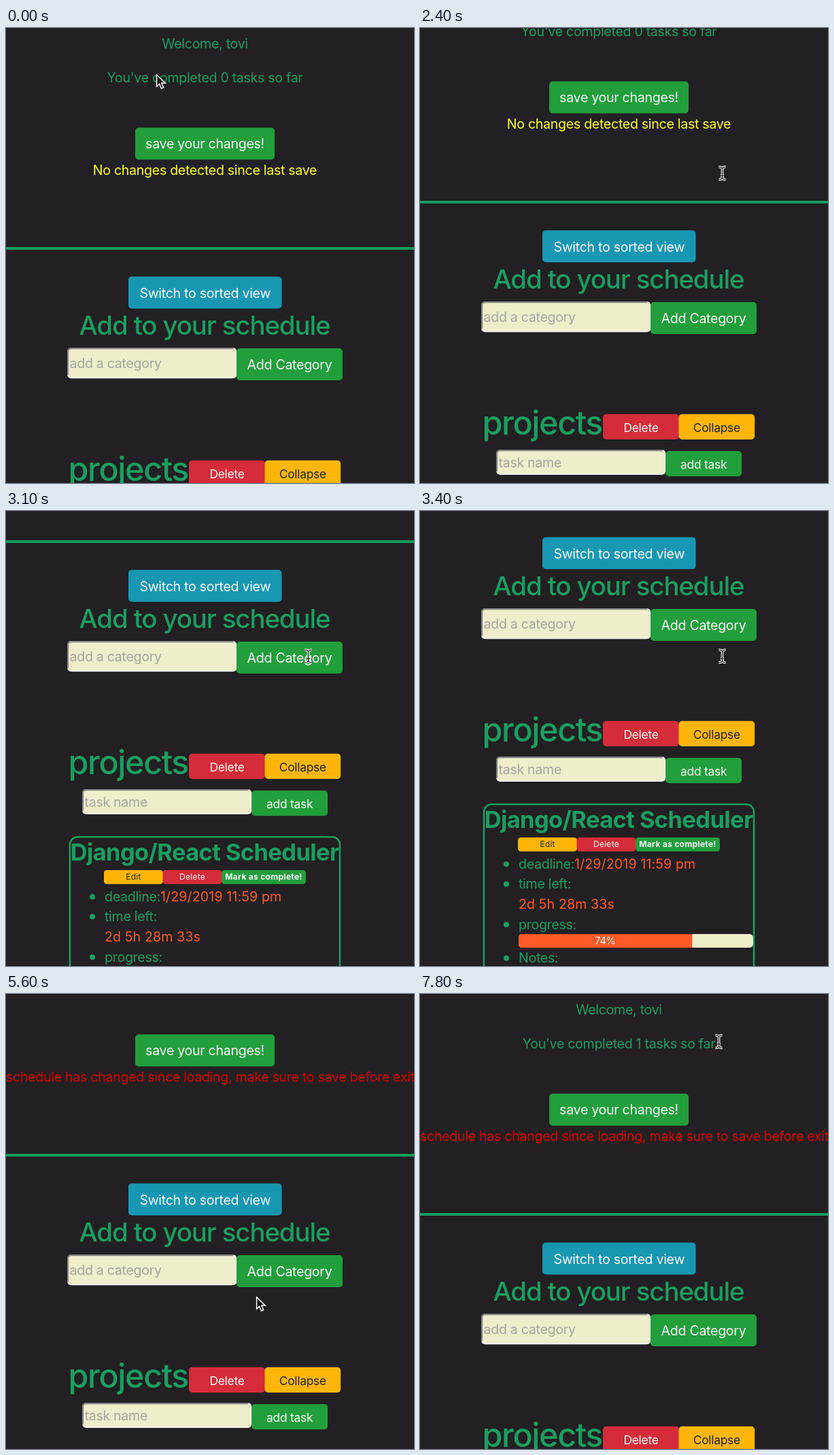
Recreate the animation shown at these times as an HTML page. Size 600 by 669 pixels, loop 7.9 s.

```html
<!DOCTYPE html>
<html lang="en">
<head>
<meta charset="utf-8">
<title>Schedule</title>
<style>
  html, body { margin: 0; width: 100%; height: 100%; overflow: hidden; background: #222022; }
  svg { display: block; width: 100%; height: 100%; }
  text {
    font-family: Inter, "Open Sans", sans-serif;
    font-variation-settings: "opsz" 14;
    font-size: 19.6px;
    letter-spacing: -.0155em;
    white-space: pre;
  }
  .mid { text-anchor: middle; }
  .h1 { font-size: 48.4px; font-weight: 500; letter-spacing: -.0285em; }
  .h2 { font-size: 38.4px; font-weight: 500; letter-spacing: -.0285em; }
  .h3 { font-size: 34.4px; font-weight: 700; letter-spacing: -.0165em; }
  .num { letter-spacing: .006em; }
  .btn { font-size: 17.4px; }
  .pct { font-size: 14.5px; }
  .tiny { font-size: 12.1px; letter-spacing: .02em; }
  .bold { font-weight: 700; }
</style>
</head>
<body>
<svg id="stage" viewBox="0 0 600 669" xmlns="http://www.w3.org/2000/svg"></svg>
<script>
const LOOP = 7900, STEP = 100, DONE = 5000;
const C = {
  bg: '#222022', text: '#1a9e62', green: '#229e3c', dark: '#1b7a30', blue: '#1897b3',
  red: '#d62c39', amber: '#ffb608', cream: '#eeeecb', hint: '#a6a6a0',
  orange: '#ff5a28', ink: '#25262a', white: '#f8f8f8', yellow: '#ffff22', alert: '#d60000'
};

const text = (x, y, str, fill = C.text, cls = '', id = '') =>
  `<text x="${x}" y="${y}" fill="${fill}" class="${cls}" id="${id}">${str}</text>`;

const box = (x, y, w, h, fill, r = 5, id = '') =>
  `<rect x="${x}" y="${y}" width="${w}" height="${h}" rx="${r}" fill="${fill}" id="${id}"/>`;

const button = (x, y, w, h, base, label, fill, cls = '', ink = C.white, id = '') =>
  box(x, y, w, h, fill, h > 30 ? 5 : 4.5, id) + text(x + w / 2, base, label, ink, 'mid ' + cls);

// Inset-bordered field: dark top and left edges, light bottom and right
const field = (x, y, w, h, base, hint) =>
  box(x, y, w, h, '#eeeee6', 6) +
  `<path d="M${x + 1.2} ${y + h - 5}V${y + 6}q0-4.8 4.8-4.8H${x + w - 5}" fill="none" stroke="#858583" stroke-width="2.4"/>` +
  box(x + 2.4, y + 2.4, w - 4.4, h - 4.4, C.cream, 3.5) +
  text(x + 3.5, base, hint, C.hint);

const bullet = y => `<circle cx="127" cy="${y}" r="4" fill="${C.text}"/>`;
const item = (y, label) => bullet(y - 6.6) + text(145, y, label);

const page =
  text(292.5, 30, 'Welcome, tovi', C.text, 'mid') +
  text(292.5, 79.5, '', C.text, 'mid', 'count') +
  button(190, 146.5, 205, 47, 177.3, 'save your changes!', C.green) +
  text(292.5, 215.6, 'No changes detected since last save', C.yellow, 'mid', 'saved') +
  text(0, 215.6, 'schedule has changed since loading, make sure to save before exit', C.alert, '', 'unsaved') +
  box(0, 322, 600, 4, '#169b62', 0) +
  button(180, 365.5, 225.5, 47, 396.6, 'Switch to sorted view', C.blue) +
  text(292, 451.2, 'Add to your schedule', C.text, 'mid h2') +
  field(90, 470, 249.5, 45.3, 500.2, 'add a category') +
  button(339, 471, 156, 47, 501.8, 'Add Category', C.green) +
  text(91.5, 666.4, 'projects', C.text, 'h1') +
  button(269, 635.7, 112, 37.3, 661.7, 'Delete', C.red, 'btn') +
  button(380.5, 635.7, 111.7, 37.3, 661.7, 'Collapse', C.amber, 'btn', C.ink) +
  field(112, 688, 249.5, 37, 713.8, 'task name') +
  button(361.3, 690, 111.7, 37.3, 716, 'add task', C.green, 'btn');

const card =
  `<rect x="94" y="758.3" width="397" height="400" rx="11" fill="none" stroke="${C.text}" stroke-width="2.5"/>` +
  text(292, 793, 'Django/React Scheduler', C.text, 'mid h3') +
  button(144, 807, 87, 20.5, 821.3, 'Edit', C.amber, 'tiny', C.ink) +
  button(230.5, 807, 87, 20.5, 821.3, 'Delete', C.red, 'tiny') +
  button(317, 807, 124, 20.5, 821.3, 'Mark as complete!', C.green, 'tiny bold', C.white, 'mark') +
  item(852.8, `deadline:<tspan class="num" fill="${C.orange}">1/29/2019 11:59 pm</tspan>`) +
  item(882.2, 'time left:') +
  text(145, 911.8, '2d 5h 28m 33s', C.orange, 'num') +
  item(941.6, 'progress:') +
  box(145, 949, 345, 20, C.cream, 5.5) +
  `<path d="M400.3 949H150.5q-5.5 0-5.5 5.5v9q0 5.5 5.5 5.5H400.3z" fill="${C.orange}"/>` +
  text(272.5, 964.2, '74%', C.white, 'mid pct') +
  item(991.2, 'Notes:') +
  text(145, 1020.8, 'You can write some notes here.', C.orange);

const beam = 'M-5.2-9.2Q0-9.4 0-6.2V6.2Q0 9.4-5.2 9.2M5.2-9.2Q0-9.4 0-6.2M0 6.2Q0 9.4 5.2 9.2M-2.6 3.6H2.6';
const pointers =
  `<path id="arrow" d="M.6.8V18L4.6 14.3 7.4 21 10.6 19.7 7.8 13.1H13.2Z" fill="#151515" stroke="#fff" stroke-width="1.5"/>` +
  `<g id="beam" fill="none"><path d="${beam}" stroke="#fff" stroke-width="3.6"/><path d="${beam}" stroke="#151515" stroke-width="1.3"/></g>` +
  `<path id="hand" d="M-2 2C-2-.6 1.5-.6 1.8 2L2.6 8C4 7 5.5 7.2 6 8.4 7.5 7.6 8.8 8 9 9.4 10.8 9 11.8 10 11.6 12 11.5 15 10.3 17 10 21.6H.8C.3 18-3.5 15.5-5 13-5.8 11.3-4 10.4-2.5 11.5L-.8 12.8Z" fill="#fff" stroke="#1a1a1a" stroke-width="1.3"/>`;

document.getElementById('stage').innerHTML =
  `<g id="page">${page}<g id="card">${card}</g></g><g id="cursor">${pointers}</g>`;

// [time, value...] with straight runs between rows
const SCROLL = [
  [0, 0], [2100, 0], [2200, 14], [2400, 68], [2800, 177], [3200, 313], [3300, 327],
  [4100, 327], [4300, 363], [DONE - 1, 363], [DONE, 87], [5700, 87], [6000, 36], [6300, 0]
];
const MOVE = [
  [0, 221, 68], [500, 330, 80], [1000, 436, 80], [1600, 444.5, 213.5], [3400, 444.5, 213.5],
  [4000, 368, 485], [4400, 368, 485], [4800, 368, 445], [6400, 368, 445],
  [7100, 500, 212], [7300, 500, 212], [7700, 439.5, 70]
];
const POINTER = [
  [0, 'arrow'], [1400, 'beam'], [3500, 'arrow'], [3900, 'hand'], [DONE + 100, 'arrow'],
  [7000, 'beam'], [7400, 'arrow'], [7700, 'beam']
];

const rowAt = (rows, t) => rows.findLastIndex(r => r[0] <= t);

function at(rows, t) {
  const i = rowAt(rows, t), [t0, ...a] = rows[i], next = rows[i + 1];
  if (!next) return a;
  const k = (t - t0) / (next[0] - t0);
  return a.map((v, n) => v + (next[n + 1] - v) * k);
}

const $ = id => document.getElementById(id);
const show = (id, on) => $(id).setAttribute('visibility', on ? 'visible' : 'hidden');
const place = (id, x, y) => $(id).setAttribute('transform', `translate(${x} ${y})`);

function draw(t) {
  const done = t >= DONE;
  const shape = POINTER[rowAt(POINTER, t)][1];
  place('page', 0, -Math.round(at(SCROLL, t)[0]));
  place('cursor', ...at(MOVE, t));
  for (const id of ['arrow', 'beam', 'hand']) show(id, id === shape);
  show('card', !done);
  show('saved', !done);
  show('unsaved', done);
  $('count').textContent = `You've completed ${done ? 1 : 0} tasks so far`;
  $('mark').setAttribute('fill', t >= 3900 && !done ? C.dark : C.green);
}

const start = performance.now();
function tick() {
  const t = (performance.now() - start) % LOOP;
  draw(Math.floor(t / STEP) * STEP);
  requestAnimationFrame(tick);
}
tick();
</script>
</body>
</html>
```
